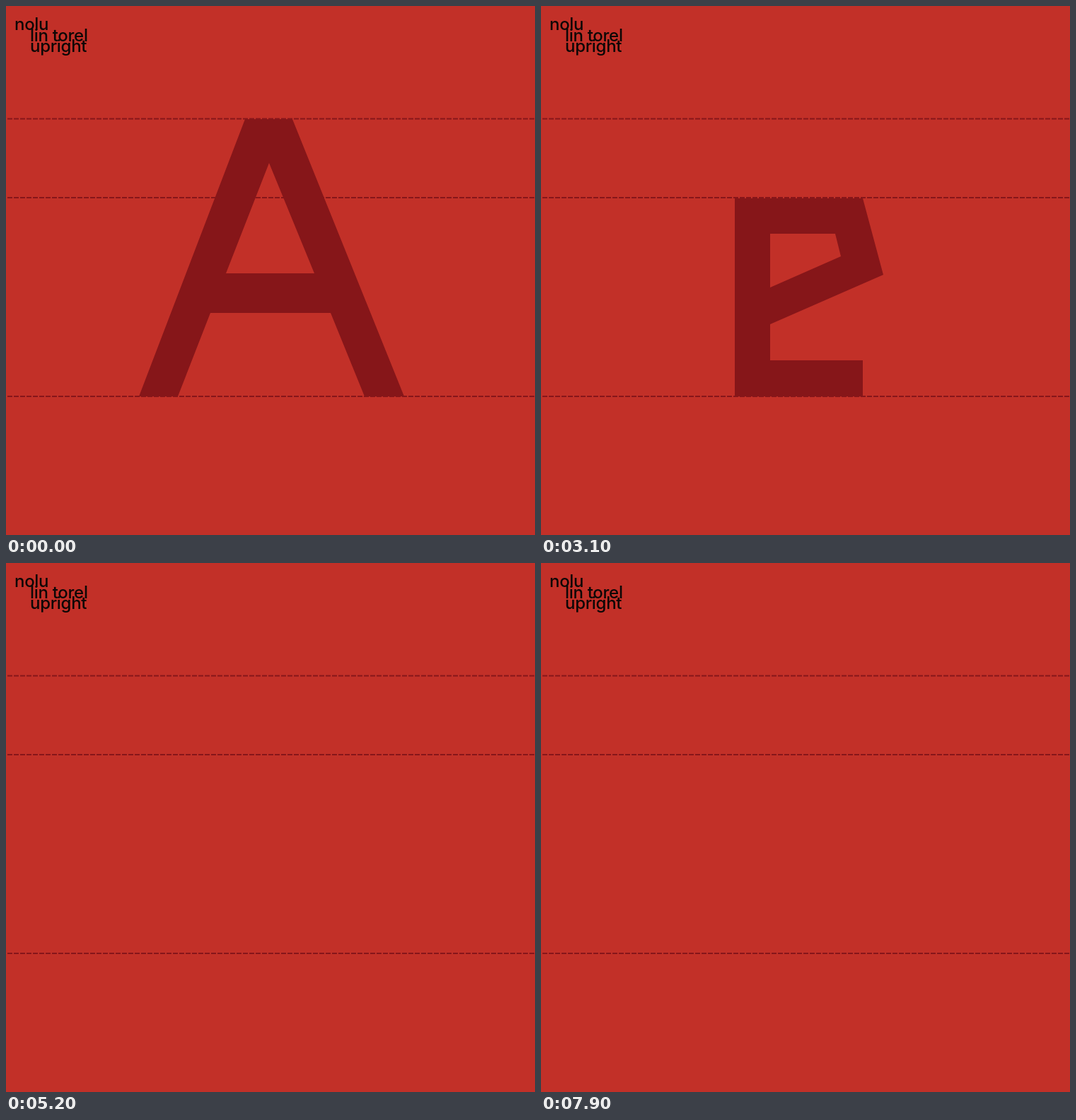
Write an HTML page that moves like this. It is 748x748 px and loops after 8000 ms.

```html
<!DOCTYPE html>
<html lang="en">
<head>
<meta charset="utf-8">
<title>Type specimen</title>
<style>
  html, body { margin: 0; width: 100%; height: 100%; overflow: hidden; background: #c23028; }
  svg { display: block; width: 100vw; height: 100vh; }
  #glyphs { fill: #861619; fill-rule: evenodd; }
  #guides { stroke: #87161a; stroke-width: 1.8; stroke-dasharray: 7 2; }
  text { font: 500 24px Inter, sans-serif; letter-spacing: -.3px; fill: #0c0706; }
</style>
</head>
<body>
<svg viewBox="0 0 748 748">
  <rect width="748" height="748" fill="#c23028"/>
  <g id="guides">
    <path d="M2 159.5H748"/>
    <path d="M2 271H748"/>
    <path d="M2 552H748"/>
  </g>
  <g id="glyphs"></g>
  <text x="12" y="34">nolu</text>
  <text x="34" y="50">lin torel</text>
  <text x="34" y="65">upright</text>
</svg>
<script>
const NS = 'http://www.w3.org/2000/svg';
const TOP = 160, MID = 278, BASE = 552;
const CAP = 56, LOW = 50;   // stroke widths

const box = (x, y, w, h) => `M${x} ${y}h${w}v${h}h${-w}z`;
const capStem = x => box(x, TOP, CAP, BASE - TOP);
const lowStem = (x, y = TOP, end = BASE) => box(x, y, LOW, end - y);

// Two horizontal bars from x to cx, joined by a half ellipse; negative rx opens right.
function bowl(x, cx, rx, y1, y2, w) {
  const out = rx > 0 ? 1 : 0, r = Math.abs(rx), ry = (y2 - y1) / 2;
  return `M${x} ${y1}H${cx}A${r} ${ry} 0 0 ${out} ${cx} ${y2}H${x}v${-w}H${cx}` +
    `A${r - w * 1.05} ${ry - w} 0 0 ${1 - out} ${cx} ${y1 + w}H${x}z`;
}
const capBowl = (x, cx, rx) => bowl(x, cx, rx, TOP, BASE, CAP);
const lowBowl = (x, cx, rx) => bowl(x, cx, rx, MID, BASE, LOW);

const glyphs = [
  /* A */ ['M188 552L338 160H405L563 552H507L459 434H289L243 552zM311 378H436L372 222z'],
  /* a */ ['M476 552H295L266 444L426 374V323H295V272H476zM426 502V426L326 470L334 502z'],
  /* B */ [capStem(243), bowl(243, 412, 98, TOP, 356, CAP), bowl(243, 421, 111, 330, BASE, CAP)],
  /* b */ [lowStem(252), lowBowl(252, 370, 135)],
  /* C */ [capBowl(511, 434, -196)],
  /* c */ [bowl(484, 401, -135, 272, BASE, LOW)],
  /* D */ [capStem(240), capBowl(240, 318, 196)],
  /* d */ [lowStem(448), lowBowl(498, 379, -135)],
  /* E */ [capStem(260), box(260, 160, 230, CAP), box(260, 328, 210, CAP), box(260, 496, 230, CAP)],
  /* e */ ['M274 272H455L484 380L324 450V501H455V552H274zM324 322V398L424 354L416 322z'],
  /* F */ [capStem(262), box(262, 160, 226, CAP), box(262, 334, 206, CAP)],
  /* f */ [lowStem(318), box(318, TOP, 128, LOW), box(290, MID, 140, LOW)],
  /* G */ [capBowl(500, 420, -196), box(456, 340, CAP, 212), box(400, 340, 112, CAP)],
  /* g */ [lowBowl(498, 379, -135), box(447.5, MID, LOW, 390.5), box(309, 618, 188.5, LOW)],
  /* H */ [capStem(238), capStem(456), box(238, 328, 274, CAP)],
  /* h */ [lowStem(261), box(261, MID, 227, LOW), lowStem(438, MID)],
  /* I */ [capStem(347)],
  /* i */ [lowStem(349.5, MID), box(349.5, TOP, LOW, LOW)],
  /* J */ ['M428 160H484V437A115 115 0 0 1 254 437H310A59 59 0 0 0 428 437z'],
  /* j */ [lowStem(360, MID, 663), box(277, 613, 133, LOW), box(360, TOP, LOW, LOW)],
  /* K */ [capStem(241), 'M297 324L442 160H514L346 350L522 552H450L297 376z'],
  /* k */ [lowStem(270), 'M320 388L420 278H486L372 402L490 552H426L338 440L320 460z'],
  /* L */ [capStem(262), box(262, 496, 225, CAP)],
  /* l */ [lowStem(349.5)]
];

const groups = glyphs.map(parts => {
  const g = document.createElementNS(NS, 'g');
  for (const d of parts) {
    const p = document.createElementNS(NS, 'path');
    p.setAttribute('d', d);
    g.append(p);
  }
  document.getElementById('glyphs').append(g);
  return g;
});

// Three letters a second on a 100 ms grid, each shown for two ticks.
const LOOP = 8000, TICK = 100, SHOWN = 200;
const starts = groups.map((_, i) => Math.round(i * 10 / 3) * TICK);

function draw(now) {
  const t = now % LOOP;
  groups.forEach((g, i) => {
    const on = t >= starts[i] && t < starts[i] + SHOWN;
    g.style.display = on ? '' : 'none';
  });
}

let begin;
function tick(now) {
  begin ??= now;
  draw(now - begin);
  requestAnimationFrame(tick);
}
draw(0);
requestAnimationFrame(tick);
</script>
</body>
</html>
```
